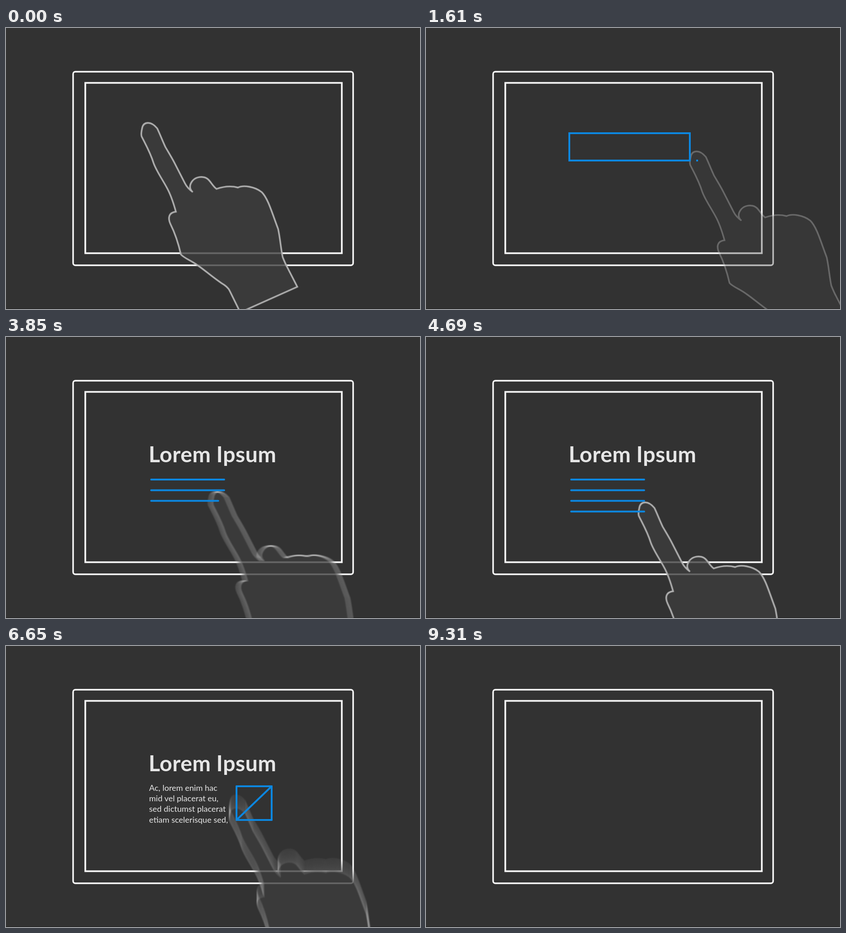
An HTML page with a canvas for the animation above (9.45 s loop, 907 px wide and 617 px high).

```html
<!DOCTYPE html>
<html lang="en">
<head>
<meta charset="utf-8">
<title>Drawing a layout by hand</title>
<style>
  html, body { margin: 0; width: 100%; height: 100%; overflow: hidden; background: #323232; }
  svg, canvas { position: absolute; left: 0; top: 0; width: 907px; height: 617px; filter: blur(.6px); }
  text { font-family: Lato, "Open Sans", sans-serif; fill: #e6e6e6; }
  #head { font-size: 48px; font-weight: 700; letter-spacing: .4px; }
  #para { font-size: 18px; }
  #head, #para, #icon { opacity: 0; }
</style>
</head>
<body>
<svg viewBox="0 0 907 617">
  <g fill="none" stroke="#f8f8f8">
    <rect x="147" y="96" width="613.5" height="425" rx="5" stroke-width="3.4"/>
    <rect x="173.7" y="120.5" width="562" height="374" stroke-width="3.7"/>
  </g>
  <rect y="616" width="907" height="1" fill="#1e1e1e"/>
  <text id="head" x="312.5" y="275">Lorem Ipsum</text>
  <g id="para">
    <text x="313.5" y="318">Ac, lorem enim hac</text>
    <text x="313.5" y="341">mid vel placerat eu,</text>
    <text x="313.5" y="364">sed dictumst placerat</text>
    <text x="313.5" y="387.5">etiam scelerisque sed,</text>
  </g>
  <g id="icon" fill="#dedede">
    <path fill-rule="evenodd" d="M503 307.5H589Q592 307.5 592 310.5V384.500Q592 387.500 589 387.500H503Q500 387.500 500 384.500V310.500Q500 307.500 503 307.500ZM511.500 319V376H581V319Z"/>
    <circle cx="532.500" cy="333" r="8"/>
    <path d="M519 369V358Q520 347 527 346.500C534 347 534 356 541 356C550 356 552 331 563 330Q571 331 573.500 343V369Z"/>
  </g>
</svg>
<canvas id="stage" width="907" height="617"></canvas>
<script>
const LOOP = 9450, STEP = 70, SHUTTER = 35, SAMPLES = 8;
const W = 907, H = 617, START = { x: 312, y: 228 };

const byId = id => document.getElementById(id);
const ctx = byId('stage').getContext('2d');
const ramp = (t, a, b) => Math.min(1, Math.max(0, (t - a) / (b - a)));
const ease = p => (1 - Math.cos(Math.PI * p)) / 2;

function layer(height) {
  const c = document.createElement('canvas');
  c.width = W;
  c.height = height;
  return c.getContext('2d');
}

// Hand sprite, placed for a fingertip at START
const handShape = new Path2D(
  'M513 624L490 577Q486 568 472 560C450 545 436 532 420 521C405 510 390 505 383 497' +
  'C378 475 371 452 360 430C354 417 356 405 372 403C367 385 361 366 352 350' +
  'C340 328 329 313 323 296C316 273 306 256 297 238Q295 233 298 220Q300 208 311 208' +
  'Q321 208 331 220C336 230 342 246 349 261C356 273 364 286 369 296L392 341' +
  'Q397 351 409 360C400 352 403 343 407 337C413 328 424 326 431 327' +
  'C446 328 449 344 461 353C475 348 490 345 508 350C520 344 545 348 560 360' +
  'C574 374 582 404 596 441C601 465 602 485 606 503Q613 520 616 525L638 568Z');
// Colours divide evenly by SAMPLES, so that adding the samples up loses nothing
const sprite = layer(640);
sprite.fillStyle = 'rgba(61,61,61,.7843)';
sprite.fill(handShape);
sprite.strokeStyle = '#b0b0b0';
sprite.lineWidth = 3.4;
sprite.stroke(handShape);
const blurred = layer(H);
blurred.globalAlpha = 1 / SAMPLES;

// Fingertip moves; pen names the drawing that the move adds to
const moves = [];
let last = START;
function move(t0, t1, x, y, pen) {
  moves.push({ t0, t1, x0: last.x, y0: last.y, x, y, pen });
  last = { x, y };
}
const dot = (t, pen) => move(t, t + 10, last.x + .01, last.y, pen);

// Headline: a box and a dot
move(0, 90, 314, 231);
move(90, 380, 578, 231, 'box');
move(380, 540, 578, 291, 'box');
move(540, 840, 314, 291, 'box');
move(840, 1000, 314, 231, 'box');
move(1000, 1450, 594, 291);
dot(1450, 'box');

// Paragraph: four lines and a dot
move(1760, 2340, 318, 313);
for (let i = 0; i < 4; i++) {
  const t = 2360 + i * 600, y = 313 + i * 23.4;
  if (i) move(t - 223, t, 318, y);
  move(t, t + 377, 478, y, 'lines');
}
move(4560, 5060, 495, last.y);
dot(5060, 'lines');

// Picture: a crossed box
move(5350, 5840, 505, 308);
move(5840, 5980, 582, 308, 'cross');
move(5980, 6110, 582, 382, 'cross');
move(6110, 6250, 505, 382, 'cross');
move(6250, 6380, 505, 308, 'cross');
move(6380, 6470, 582, 308);
move(6470, 6630, 505, 382, 'cross');
move(6630, 6740, 505, 308);
move(6740, 7040, 582, 382, 'cross');
move(7080, 7350, 630, 400);

const inkFade = { box: [1680, 1820], lines: [5300, 5500], cross: [7250, 7450] };

function along(m, t) {
  const k = ease(ramp(t, m.t0, m.t1));
  return { x: m.x0 + (m.x - m.x0) * k, y: m.y0 + (m.y - m.y0) * k };
}

function fingertip(t) {
  return along(moves.filter(m => m.t0 <= t).pop(), t);
}

// Adds one half of the exposure to the stage
function expose(t, alpha) {
  blurred.globalCompositeOperation = 'source-over';
  blurred.clearRect(0, 0, W, H);
  blurred.globalCompositeOperation = 'lighter';
  for (let i = 0; i < SAMPLES; i++) {
    const p = fingertip(t + SHUTTER / 2 * i / SAMPLES);
    blurred.drawImage(sprite.canvas, p.x - START.x, p.y - START.y);
  }
  ctx.globalAlpha = alpha / 2;
  ctx.drawImage(blurred.canvas, 0, 0);
}

function drawHand(t) {
  const alpha = 1 - ramp(t, 1500, 1690) + ramp(t, 1890, 2100)
    - ramp(t, 5150, 5350) + ramp(t, 5740, 5880) - ramp(t, 7080, 7350);
  if (alpha <= 0) return;
  ctx.globalCompositeOperation = 'lighter';
  expose(t, alpha);
  expose(t + SHUTTER / 2, alpha);
  ctx.globalCompositeOperation = 'source-over';
}

function drawInk(t) {
  ctx.strokeStyle = '#0c87e0';
  ctx.lineWidth = 4;
  for (const m of moves) {
    if (!m.pen || t < m.t0) continue;
    const alpha = 1 - ramp(t, ...inkFade[m.pen]);
    if (alpha <= 0) continue;
    const p = along(m, t + SHUTTER / 2);
    ctx.globalAlpha = alpha;
    ctx.lineCap = m.pen === 'box' ? 'square' : 'round';
    ctx.beginPath();
    ctx.moveTo(m.x0, m.y0);
    ctx.lineTo(p.x, p.y);
    ctx.stroke();
  }
}

function show(id, t, a, b) {
  byId(id).style.opacity = ramp(t, a, b) * (1 - ramp(t, 8750, 9310));
}

function render(t) {
  show('head', t, 1750, 1960);
  show('para', t, 5350, 5670);
  show('icon', t, 7280, 7630);
  ctx.clearRect(0, 0, W, H);
  drawHand(t);
  drawInk(t);
}

const begin = performance.now();
function tick() {
  const t = (performance.now() - begin) % LOOP;
  render(Math.floor(t / STEP) * STEP);
  requestAnimationFrame(tick);
}
tick();
</script>
</body>
</html>
```
